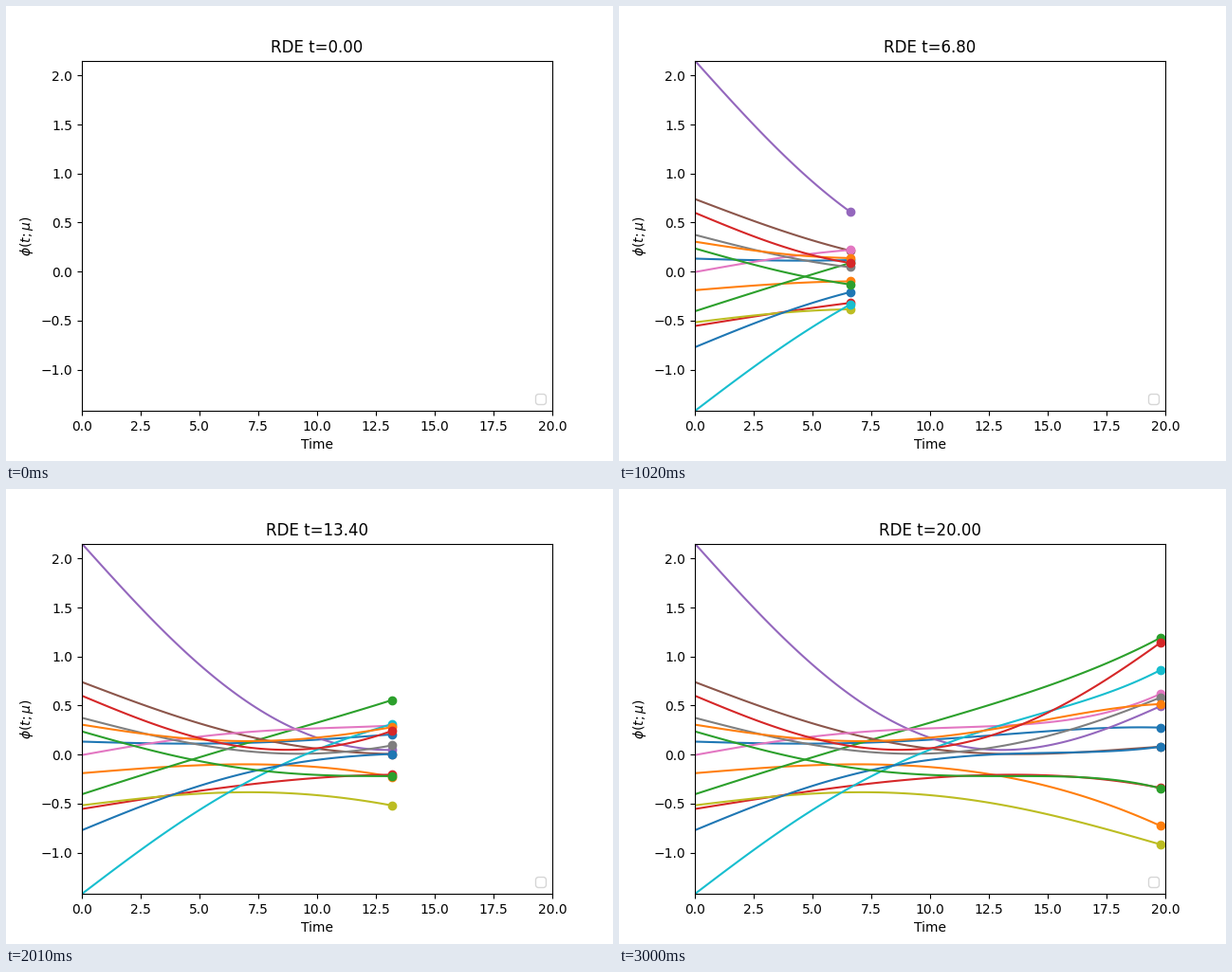
Write a matplotlib script that moves like this. It is 640 px wide and 480 px high and loops after 3.03 s.

```python
import numpy as np
import matplotlib.pyplot as plt
from matplotlib.animation import FuncAnimation

FRAMES = 101
DT = 0.2

# Height of each path at its start and after each third of the run.
KEYS = np.array([
    (0.132, 0.117, 0.206, 0.275),
    (-0.190, -0.100, -0.228, -0.728),
    (-0.405, 0.087, 0.557, 1.192),
    (-0.555, -0.320, -0.206, -0.340),
    (2.152, 0.610, 0.047, 0.494),
    (0.740, 0.213, 0.006, 0.080),
    (-0.005, 0.221, 0.296, 0.620),
    (0.375, 0.045, 0.094, 0.583),
    (-0.518, -0.385, -0.520, -0.917),
    (-1.422, -0.337, 0.312, 0.863),
    (-0.772, -0.210, 0.006, 0.080),
    (0.305, 0.138, 0.280, 0.515),
    (0.236, -0.132, -0.220, -0.345),
    (0.600, 0.088, 0.243, 1.143),
])


def basis(u):
    """Powers without a square term: every path leaves straight, then bends."""
    return np.asarray(u, float)[:, None] ** [0, 1, 3, 4]


time = np.arange(FRAMES) * DT
thirds = time / time[-2] * 3
paths = (basis(thirds) @ np.linalg.solve(basis(range(4)), KEYS.T)).T

fig, ax = plt.subplots(figsize=(6.4, 4.8), dpi=100)
ax.set_xlim(0, time[-1])
ax.set_ylim(KEYS[:, 0].min(), KEYS[:, 0].max())
ax.set_xlabel("Time")
ax.set_ylabel(r"$\phi(t;\mu)$")
ax.legend([], [], loc="lower right")
title = ax.set_title("RDE t=0.00")

colors = [f"C{k % 10}" for k in range(len(paths))]
lines = [ax.plot([], [], color=c)[0] for c in colors]
dots = [ax.plot([], [], "o", color=c)[0] for c in colors]


def update(i):
    for line, dot, y in zip(lines, dots, paths):
        line.set_data(time[:i], y[:i])
        dot.set_data(time[:i][-1:], y[:i][-1:])
    title.set_text(f"RDE t={time[i]:.2f}")
    return [*lines, *dots, title]


anim = FuncAnimation(fig, update, frames=FRAMES, interval=30, repeat=True, repeat_delay=0)
plt.show()
```
